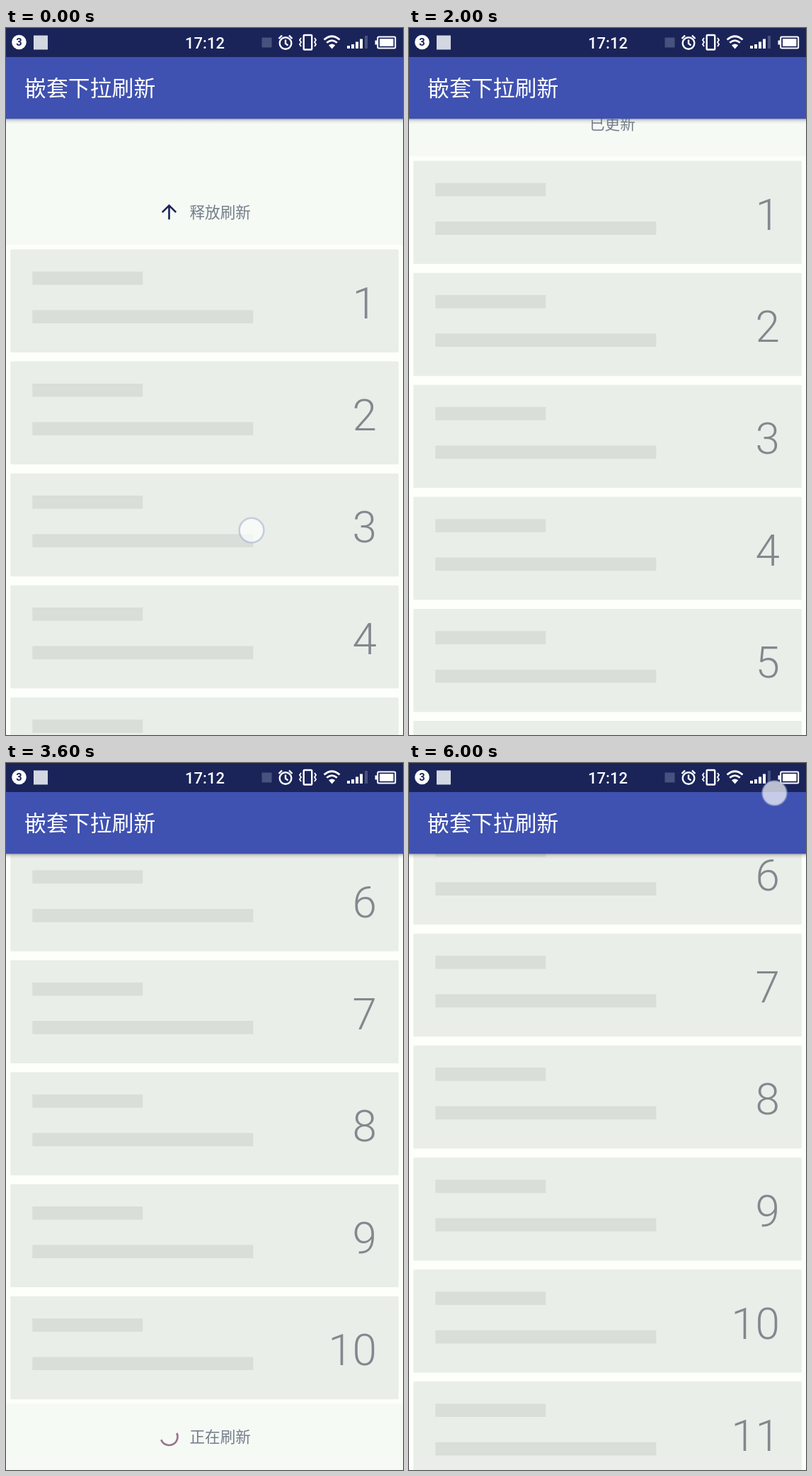
These frames come from a looping animation (561 by 998 pixels, 6.1 s). An HTML page:

```html
<!DOCTYPE html>
<html lang="zh-CN">
<head>
<meta charset="utf-8">
<style>
html, body { margin: 0; width: 100%; height: 100%; overflow: hidden; background: #fcfffa; }
svg { display: block; width: 561px; height: 998px; }
.cjk { font-family: "Noto Sans CJK SC", "Noto Sans CJK", sans-serif; }
.hint { font-size: 21.6px; fill: #747d8a; }
.num { font: 300 62px Roboto, "Liberation Sans", sans-serif; fill: #83888e; text-anchor: end; }
.line { fill: none; stroke: #fff; stroke-width: 2.4; }
</style>
</head>
<body>
<svg viewBox="0 0 561 998" xmlns="http://www.w3.org/2000/svg">
  <defs>
    <linearGradient id="shade" x1="0" y1="0" x2="0" y2="1">
      <stop offset="0" stop-color="#4a5068" stop-opacity=".55"/>
      <stop offset=".4" stop-color="#6a7078" stop-opacity=".18"/>
      <stop offset="1" stop-color="#6a7078" stop-opacity="0"/>
    </linearGradient>
    <g id="card">
      <rect x="6.3" width="548.5" height="145.5" rx="1.5" fill="#eaeee9"/>
      <path d="M37.3 31.3h156v18.7h-156zM37.3 85.7h312v18.7h-312z" fill="#d9ded8"/>
    </g>
  </defs>
  <rect width="561" height="998" fill="#fcfffa"/>
  <rect id="headBg" y="100" width="561" fill="#f5faf5"/>
  <g id="head"></g>
  <g id="foot"></g>
  <g id="list"></g>

  <rect y="128" width="561" height="7" fill="url(#shade)"/>
  <rect y="40" width="561" height="88" fill="#3f51b1"/>
  <rect width="561" height="41" fill="#1a2459"/>
  <text class="cjk" x="26" y="95.5" font-size="30.9" fill="#fff">嵌套下拉刷新</text>

  <circle cx="18.5" cy="20" r="10.3" fill="#fff"/>
  <text x="18.5" y="25.2" font-family="Roboto, sans-serif" font-weight="700" font-size="14.5" fill="#1a2459" text-anchor="middle">3</text>
  <rect x="39" y="10.5" width="20" height="20" fill="#d3d7e1"/>
  <text x="281" y="28.6" font-family="Roboto, sans-serif" font-weight="500" font-size="22" fill="#fff" text-anchor="middle">17:12</text>
  <rect x="361.5" y="13.5" width="14" height="14" fill="#47527f"/>
  <g class="line">
    <circle cx="395" cy="21.5" r="8.3"/>
    <path d="M395 16.5v5.5l3.5 2.5M385.5 15l4.5-4.5M404.500 15l-4.500-4.500"/>
    <rect x="420.700" y="10" width="11.500" height="20.500" rx="1"/>
    <path d="M417 14l-2 3 2 3-2 3 2 3M436 14l2 3-2 3 2 3-2 3" stroke-width="1.800"/>
    <path d="M449.500 16.500q11-9.500 22 0M453.200 20.800q7.300-6.300 14.600 0" stroke-width="2.800"/>
    <rect x="525.200" y="12.500" width="25" height="16" rx="1.500" stroke-width="2"/>
  </g>
  <path d="M456 24.300q4.600-3.600 9.200 0L460.600 29.500z" fill="#fff"/>
  <path d="M482 25h4v4h-4zM488 23h4v6h-4zM494 19.500h4v9.500h-4zM500 15.500h4v13.500h-4zM528 15.300h19.500v10.400h-19.500zM521.500 17.500h3v6h-3z" fill="#fff"/>
  <path d="M507 11h4v18h-4z" fill="#47527f"/>

  <circle id="touch" r="17.300" fill="#fff" fill-opacity=".7" stroke="#8f9fc8" stroke-opacity=".45" stroke-width="2.600"/>
</svg>
<script>
const LOOP = 6100, STEP = 100, PITCH = 158.1, REST = 134.3, GAP = 6.3, PANEL = 93.5;
const $ = id => document.getElementById(id);
const show = (el, on) => el.setAttribute("display", on ? "inline" : "none");
const move = (el, x, y) => el.setAttribute("transform", `translate(${x} ${y})`);
const clamp = x => Math.max(0, Math.min(1, x));
const easeOut = x => 1 - (1 - clamp(x)) ** 2;
const mix = (a, b, k) => a + (b - a) * k;

const cards = Array.from({ length: 13 }, (_, i) => {
  $("list").insertAdjacentHTML("beforeend",
    `<g><use href="#card"/><text class="num" x="524" y="97.500">${i + 1}</text></g>`);
  return $("list").lastElementChild;
});

// Refresh panel content, centred on y = 0.
function makePanel(g, bg) {
  g.innerHTML = (bg ? `<rect y="-46.500" width="561" height="${PANEL}" fill="#f5faf5"/>` : "") +
    `<path d="M230.500 10.500V-9M220.800 .500l9.700-9.700 9.700 9.700" fill="none" stroke="#1a2459" stroke-width="2.600"/>
     <path fill="none" stroke="#9b6f8c" stroke-width="2.600"/>
     <text class="cjk hint" y="8"></text>`;
  const [arrow, arc] = g.querySelectorAll("path"), label = g.querySelector("text");
  return (state, spin) => {
    show(arrow, state === "release");
    show(arc, state === "busy");
    label.textContent = { release: "释放刷新", busy: "正在刷新", done: "已更新" }[state];
    label.setAttribute("x", state === "done" ? 255 : 259.500);
    if (state === "busy") arc.setAttribute("d", arcPath(spin));
  };
}

function arcPath(ms) {
  const mid = 67 + (ms - 100) * 0.675;
  const half = (205 - 20 * Math.cos((ms - 100) / 600 * Math.PI)) / 2;
  const at = deg => {
    const a = deg * Math.PI / 180;
    return `${230.500 + 12 * Math.cos(a)} ${12 * Math.sin(a)}`;
  };
  return `M${at(mid - half)}A12 12 0 1 1 ${at(mid + half)}`;
}

const setHead = makePanel($("head"), false), setFoot = makePanel($("foot"), true);

const fling = [REST, 108.6, 22, -178, -390, -555, -640, -670.2];

// Top edge of the first card.
function listTop(t) {
  if (t < 1900) return mix(312.500, 227.700, easeOut((t - 200) / 350));
  if (t < 2900) return mix(227.700, REST, easeOut((t - 1900) / 408));
  if (t < 3600) {
    const p = (t - 2900) / 100, i = Math.floor(p);
    return mix(fling[i], fling[i + 1], p - i);
  }
  return mix(-670.2, -707.9, easeOut((t - 4700) / 200));
}

function touchAt(t, y) {
  if (t < 300) return [347, 709];
  if (t >= 2800 && t < 3200) return [414 + (108.6 - y) * 0.06, 792 + y - 108.6];
  if (t >= 6000) return [516.500, 42.500];
  return null;
}

function draw(t) {
  const y = listTop(t), loaded = t >= 4700;
  cards.forEach((c, i) => {
    const top = y + i * PITCH;
    move(c, 0, top);
    show(c, top > -50 && top < 998 && (i < 10 || loaded));
  });
  $("headBg").setAttribute("height", Math.max(0, y - GAP - 100));
  move($("head"), 0, y - GAP - 46.500);
  show($("head"), t < 2900);
  setHead(t < 300 ? "release" : t < 1400 ? "busy" : "done", t - 400);

  move($("foot"), 0, y + 10 * PITCH - GAP + 46.500);
  show($("foot"), t >= 3000 && !loaded);
  setFoot(t < 4500 ? "busy" : "done", t - 3500);

  const finger = touchAt(t, y);
  show($("touch"), finger);
  if (finger) move($("touch"), ...finger);
}

const start = performance.now();
function tick() {
  const t = (performance.now() - start) % LOOP;
  draw(Math.floor(t / STEP) * STEP);
  requestAnimationFrame(tick);
}
tick();
</script>
</body>
</html>
```
